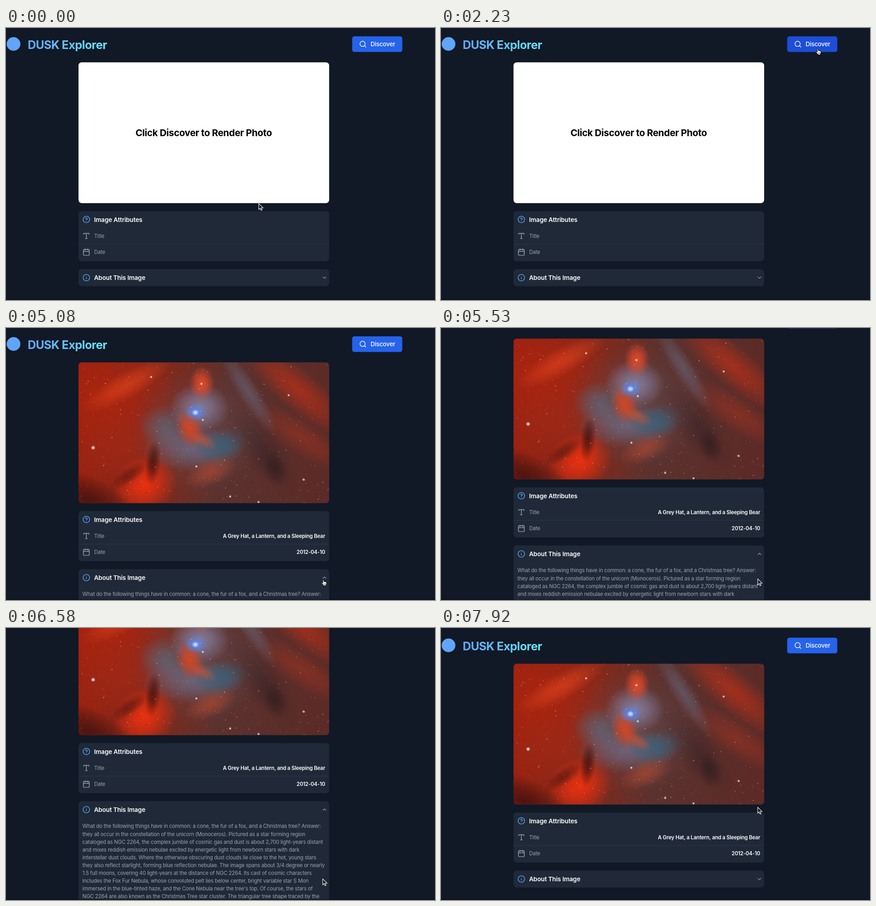
Animation of 939x596 px, one loop 8000 ms. Source, as an HTML page with a canvas:

```html
<!DOCTYPE html>
<html lang="en">
<head>
<meta charset="utf-8">
<title>Explorer</title>
<style>
html, body { margin: 0; width: 100%; height: 100%; overflow: hidden; background: #111826; }
#stage { position: relative; width: 939px; height: 596px; overflow: hidden; background: #111826; }
#page, #page > *, #pointer { position: absolute; left: 0; top: 0; }
svg { display: block; overflow: visible; }
#page #photo { left: 158px; top: 75px; width: 550px; height: 310px; }
#edge { position: absolute; left: 0; right: 0; bottom: 0; height: 2px; background: rgba(0, 0, 0, .3); }
text { font-family: Inter, "Noto Sans", sans-serif; letter-spacing: -.018em; fill: #fff; white-space: pre; }
.brand { font-size: 25.3px; font-weight: 700; letter-spacing: -.023em; fill: url(#sky); }
.hero { font-size: 20.6px; font-weight: 700; fill: #000; text-anchor: middle; }
.head { font-size: 13.5px; font-weight: 600; letter-spacing: -.01em; }
.btn { font-size: 13.3px; font-weight: 500; }
.body { font-size: 11.4px; letter-spacing: -.02em; fill: #9ca3af; }
.value { font-size: 11.4px; font-weight: 600; text-anchor: end; }
.icon { fill: none; stroke-width: 2; stroke-linecap: round; stroke-linejoin: round; }
.card { fill: #1f2937; }
</style>
</head>
<body>
<div id="stage">
  <div id="page">
    <svg id="ui" width="939" height="900"></svg>
    <canvas id="photo" width="1100" height="620"></canvas>
  </div>
  <div id="edge"></div>
  <svg id="pointer" width="20" height="20">
    <path id="arrow" d="M1.3 .8v13l3-2.8 2 4.5 2.2-.9-2-4.4h4.2z" fill="#0b0d12" stroke="#fff" stroke-width="1.1"/>
    <g id="hand" transform="translate(-4)" stroke="#000" stroke-linejoin="round">
      <path d="M3.2 1.5c0-1.5 2-1.5 2.2 0l.6 3.3c.9-.5 1.7-.2 1.9.5 1-.5 1.7-.1 1.9.6 1-.3 1.8.1 1.9 1.2.2 2.2-.3 3.4-1 4.7l-.2 2h-5l-.9-1.6L1.2 8.5c-1-1.3.3-2.4 1.4-1.4l1.3 1.2z" fill="#fff" stroke-width="1"/>
      <path d="M6.3 9v2.6M8 9v2.6M9.6 9v2.6" fill="none" stroke-width=".7"/>
    </g>
  </svg>
</div>
<script>
const LOOP = 8000;
const $ = id => document.getElementById(id);

const story = [
  'What do the following things have in common: a cone, the fur of a fox, and a Christmas tree? Answer:',
  'they all occur in the constellation of the unicorn (Monoceros). Pictured as a star forming region',
  'cataloged as NGC 2264, the complex jumble of cosmic gas and dust is about 2,700 light-years distant',
  'and mixes reddish emission nebulae excited by energetic light from newborn stars with dark',
  'interstellar dust clouds. Where the otherwise obscuring dust clouds lie close to the hot, young stars',
  'they also reflect starlight, forming blue reflection nebulae. The image spans about 3/4 degree or nearly',
  '1.5 full moons, covering 40 light-years at the distance of NGC 2264. Its cast of cosmic characters',
  'includes the Fox Fur Nebula, whose convoluted pelt lies below center, bright variable star S Mon',
  'immersed in the blue-tinted haze, and the Cone Nebula near the tree\'s top. Of course, the stars of',
  'NGC 2264 are also known as the Christmas Tree star cluster. The triangular tree shape traced by the',
  'stars appears sideways here, with its apex at the Cone Nebula.'
];

const text = (x, y, cls, str) => `<text x="${x}" y="${y}" class="${cls}">${str}</text>`;
const icon = (x, y, color, d, size = 17.1, id = '') =>
  `<g transform="translate(${x} ${y}) scale(${size / 24})"><path id="${id}" class="icon" stroke="${color}" transform="translate(-12 -12)" d="${d}"/></g>`;
const card = (y, h, id) => `<rect id="${id}" class="card" x="158.7" y="${y}" width="548.6" height="${h}" rx="7"/>`;

const BLUE = '#60a5fa', GRAY = '#9ca3af';
const RING = 'M2 12a10 10 0 1 0 20 0a10 10 0 1 0-20 0';
const DOWN = 'm6 9 6 6 6-6', UP = 'm18 15-6-6-6 6';

$('ui').innerHTML = `
  <defs><linearGradient id="sky" gradientUnits="userSpaceOnUse" x1="48" x2="222" y1="0" y2="0">
    <stop stop-color="#60a5fa"/><stop offset="1" stop-color="#67e8f9"/></linearGradient></defs>
  <circle cx="16.5" cy="35" r="15" fill="${BLUE}"/>
  ${text(47.5, 45.5, 'brand', 'DUSK Explorer')}
  <rect id="button" x="757.7" y="18.2" width="109.7" height="34.4" rx="5"/>
  ${icon(781.2, 35.4, '#fff', 'M3 11a8 8 0 1 0 16 0a8 8 0 1 0-16 0M21 21l-4.3-4.3')}
  ${text(798, 40.3, 'btn', 'Discover')}
  ${card(75.3, 308.5, 'frame')}
  <g id="hero">${text(432.7, 237, 'hero', 'Click Discover to Render Photo')}</g>
  ${card(401.3, 109.8, 'facts')}
  <path d="M159 473.5h548" stroke="#2d3747"/>
  ${icon(175.9, 419.5, BLUE, RING + 'M9.1 9a3 3 0 0 1 5.8 1c0 2-3 3-3 3M12 17h.01')}
  ${text(192.7, 424.6, 'head', 'Image Attributes')}
  ${icon(175.9, 455.7, GRAY, 'M4 7V4h16v3M9 20h6M12 4v16')}
  ${text(193, 460, 'body', 'Title')}
  ${icon(175.9, 491, GRAY, 'M5 4h14a2 2 0 0 1 2 2v14a2 2 0 0 1-2 2H5a2 2 0 0 1-2-2V6a2 2 0 0 1 2-2M16 2v4M8 2v4M3 10h18')}
  ${text(193, 495.3, 'body', 'Date')}
  <g id="values">
    ${text(698.5, 460, 'value', 'A Grey Hat, a Lantern, and a Sleeping Bear')}
    ${text(698.5, 495.3, 'value', '2012-04-10')}
  </g>
  ${card(528.4, 37.3, 'about')}
  ${icon(175.9, 547, BLUE, RING + 'M12 16v-4M12 8h.01')}
  ${text(192.7, 552, 'head', 'About This Image')}
  ${icon(697, 547, GRAY, DOWN, 13.7, 'chevron')}
  <g id="story">${story.map((s, i) => text(167.3, 587.4 + i * 17.1, 'body', s)).join('')}</g>`;

// Nebula: soft ellipses [colour, x, y, rx, ry, alpha, tilt]
const clouds = [
  ['#b8260f', 70, 80, 150, 120, .6, 0],
  ['#e8461f', 105, 50, 110, 30, .6, -.5],
  ['#ab2a17', 95, 190, 130, 80, .5, 0],
  ['#b83019', 480, 60, 160, 45, .75, .7],
  ['#9c3322', 490, 165, 130, 38, .6, .6],
  ['#3d2527', 400, 190, 120, 45, .7, .9],
  ['#2c1a1c', 430, 232, 26, 40, .6, -.3],
  ['#6a6a80', 372, 65, 110, 24, .6, 1.0],
  ['#65484c', 265, 150, 150, 140, .7, 0],
  ['#5b7088', 190, 145, 60, 50, .65, .3],
  ['#6d7290', 250, 190, 110, 50, .7, 0],
  ['#888cb4', 265, 100, 66, 54, .8, 0],
  ['#2f6480', 312, 182, 62, 38, .7, -.2],
  ['#f04c28', 270, 46, 28, 38, .9, 0],
  ['#df451f', 243, 145, 30, 44, .9, -.3],
  ['#cf5230', 272, 170, 36, 16, .6, .5],
  ['#ad4a32', 290, 240, 62, 30, .7, -.4],
  ['#4f86ff', 256, 110, 24, 18, .95, 0],
  ['#dfe8ff', 256, 110, 8, 7, 1, 0],
  ['#ee3110', 145, 268, 74, 62, .95, -.5],
  ['#461310', 22, 300, 115, 50, .9, .4],
  ['#3a0f0d', 163, 220, 17, 50, .75, .1],
  ['#4a1511', 110, 248, 48, 18, .65, -.6]
];
const brightStars = [[32, 187], [460, 72], [272, 126], [269, 47], [159, 32], [493, 257], [332, 294], [394, 306], [258, 228]];

function paintPhoto() {
  const c = $('photo').getContext('2d');
  c.scale(2, 2);
  c.translate(.7, .3);
  c.beginPath();
  c.roundRect(0, 0, 548.6, 308.5, 7);
  c.clip();
  const base = c.createLinearGradient(0, 0, 548, 60);
  [[0, '#9c210f'], [.35, '#82291b'], [.6, '#5b322f'], [1, '#5c2b27']].forEach(s => base.addColorStop(...s));
  c.fillStyle = base;
  c.fillRect(0, 0, 549, 309);

  const glow = (color, x, y, rx, ry, alpha, tilt = 0) => {
    c.save();
    c.translate(x, y);
    c.rotate(tilt);
    c.scale(rx, ry);
    const g = c.createRadialGradient(0, 0, 0, 0, 0, 1);
    g.addColorStop(0, color);
    g.addColorStop(.4, color + 'b0');
    g.addColorStop(1, color + '00');
    c.globalAlpha = alpha;
    c.fillStyle = g;
    c.fillRect(-1, -1, 2, 2);
    c.restore();
  };
  clouds.forEach(k => glow(...k));

  let seed = 7;
  const rand = () => (seed = seed * 16807 % 2147483647) / 2147483647;
  for (let i = 0; i < 900; i++) {
    c.globalAlpha = .25 + rand() * .5;
    c.fillStyle = rand() < .5 ? '#ffb89a' : '#f3dcd6';
    const r = .35 + rand() ** 6 * .8;
    c.beginPath();
    c.arc(rand() * 548, rand() * 308, r, 0, 7);
    c.fill();
  }
  brightStars.forEach(([x, y], i) => {
    const r = i ? 3 : 5;
    glow('#ffffff', x, y, r, r, 1);
  });
}
paintPhoto();

// Held steps: [start, x, y] for the pointer, [start, offset] for scrolling
const moves = [
  [0, 552, 384],
  [300, 560, 394], [450, 596, 432], [600, 645, 490], [740, 682, 540], [890, 694, 556], [1040, 695, 552], [1190, 695, 547],
  [1640, 699, 522], [1790, 728, 405], [1930, 775, 195], [2080, 812, 70], [2230, 824, 45],
  [3880, 818, 72], [4030, 775, 230], [4180, 715, 450], [4330, 693, 558], [4630, 694, 551],
  [5380, 692, 549],
  [6880, 692, 530], [7030, 692, 480], [7180, 693, 432], [7330, 694, 402], [7470, 694, 395], [7620, 692, 392]
];
const scrolls = [
  [0, 0], [740, 3], [890, 0],
  [5380, 12], [5530, 52], [5680, 98], [5830, 130], [5980, 145], [6130, 149],
  [6280, 156], [6430, 152], [6580, 149], [7620, 0], [7920, -3]
];
const at = (table, t) => table.findLast(row => row[0] <= t);
const show = (id, on) => { $(id).style.display = on ? '' : 'none'; };

function render(t) {
  const [, x, y] = at(moves, t);
  const scroll = at(scrolls, t)[1];
  const loaded = t >= 3280, pictured = t >= 3580, open = t >= 5080 && t < 7620;
  const py = y + scroll;
  const onButton = x > 758 && x < 867 && py > 18 && py < 53;
  const onAbout = x > 159 && x < 707 && py > 528 && py < 566;
  const hand = onButton || onAbout;

  $('page').style.transform = `translateY(${-scroll}px)`;
  $('pointer').style.transform = `translate(${x}px, ${y}px)`;
  show('hand', hand);
  show('arrow', !hand);
  $('button').style.fill = onButton ? '#1d4ed8' : '#2563eb';
  $('frame').style.fill = loaded ? '#1f2937' : '#fff';
  show('hero', !loaded);
  show('values', loaded);
  show('photo', pictured);
  show('story', open);
  $('about').setAttribute('height', open ? 300 : 37.3);
  $('chevron').setAttribute('d', open ? UP : DOWN);
}

const begin = performance.now();
function tick() {
  render((performance.now() - begin) % LOOP);
  requestAnimationFrame(tick);
}
tick();
</script>
</body>
</html>
```
